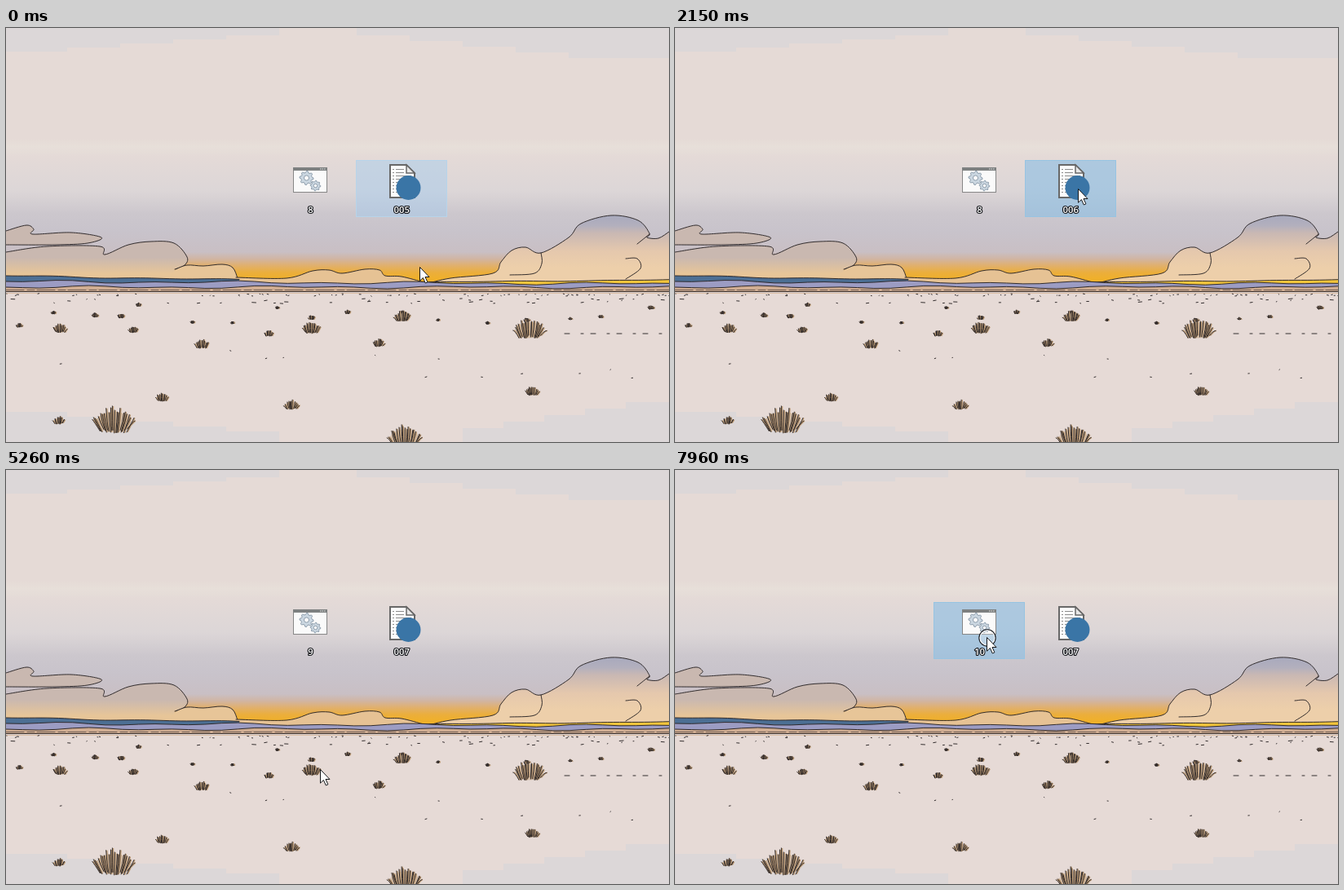
Animation, 813 px wide and 508 px high, one loop 8000 ms. Source, as an HTML page:

```html
<!DOCTYPE html>
<html lang="en">
<head>
<meta charset="utf-8">
<title>Desert desktop</title>
<style>
  html, body { margin: 0; width: 100%; height: 100%; overflow: hidden; background: #e6dad6; }
  svg { display: block; width: 100%; height: 100%; }
  .ink { fill: none; stroke: #2a2425; stroke-width: .95; stroke-linecap: round; stroke-linejoin: round; }
  .label { font: 600 11.3px "Open Sans", "Noto Sans", sans-serif; text-anchor: middle; fill: #fff;
    stroke: #101216; stroke-width: 2.2px; stroke-linejoin: round; paint-order: stroke; }
</style>
</head>
<body>
<svg viewBox="0 0 813 508" preserveAspectRatio="none">
  <defs>
    <linearGradient id="sky" gradientUnits="userSpaceOnUse" x1="0" y1="0" x2="0" y2="325"></linearGradient>
    <linearGradient id="west" gradientUnits="userSpaceOnUse" x1="0" y1="242" x2="0" y2="308">
      <stop offset=".6" stop-color="#c9b8b0"/><stop offset=".9" stop-color="#e7c598"/>
    </linearGradient>
    <linearGradient id="east" gradientUnits="userSpaceOnUse" x1="0" y1="230" x2="0" y2="310">
      <stop offset="0" stop-color="#a8a9bd"/><stop offset=".16" stop-color="#b3b0bd"/>
      <stop offset=".27" stop-color="#c9b8b3"/><stop offset=".55" stop-color="#e5c8ad"/><stop offset=".8" stop-color="#edcfaa"/>
    </linearGradient>
  </defs>
  <rect width="813" height="325" fill="url(#sky)"/>
  <g id="land"></g>
  <rect y="324" width="813" height="184" fill="#e6dad6"/>
  <g id="corners" fill="#dcd7d8"></g>
  <path class="ink" d="M0 323.5H813"/>
  <path d="M0 325.5H813" stroke="#d9bca3"/>
  <g id="plants"></g>

  <rect id="pick8" x="317.5" y="162.5" width="111" height="69"/>
  <rect id="pickDoc" x="429.5" y="162.5" width="111" height="69"/>

  <rect x="352.5" y="171.5" width="41" height="30" fill="#fafafa" stroke="#878787"/>
  <path d="M352 171H394V175H352Z" fill="#7d8080"/>
  <path d="M385 173H392" stroke="#e8e8e8" stroke-dasharray="1.5 1"/>
  <g id="gears" fill="#cbd7e1" stroke="#8596a5" stroke-width=".9"></g>

  <path d="M471 168H491L501 178V208H471Z" fill="#fcfcfc" stroke="#686868" stroke-width="2"/>
  <path d="M491 168V178H501Z" fill="#e8e8e8" stroke="#686868" stroke-width="1.5"/>
  <path id="rows" stroke="#8c8c8c"/>
  <circle cx="493.5" cy="196" r="15" fill="#3a75a6"/>

  <text id="name8" class="label" x="373.5" y="227.3"></text>
  <text id="nameDoc" class="label" x="485.2" y="227.3"></text>

  <g id="cursor">
    <g id="ring" fill="none">
      <circle cx="1" cy="1" r="9.2" stroke="#fff" stroke-width="1.4" fill="#fff" fill-opacity=".25"/>
      <circle cx="1" cy="1" r="10.2" stroke="#1c1f24" stroke-width="1.1"/>
    </g>
    <path d="M.5 .5V17.2L4.4 13.5 7.3 20 9.9 18.8 7 12.5H12Z" fill="#fff" stroke="#15171a"/>
  </g>
</svg>
<script>
const $ = id => document.getElementById(id);
const loop = (n, f) => Array.from({ length: n }, (_, i) => f(i)).join('');
let seed = 11;
const rnd = () => (seed = seed * 16807 % 2147483647) / 2147483647;
const span = (a, b) => a + (b - a) * rnd();

// Smooth path through "x,y x,y ..." points
function curve(text) {
  const p = text.split(' ').map(s => s.split(',').map(Number));
  const handle = (at, from, to, k) => at.map((v, j) => v + (to[j] - from[j]) * k / 6);
  return `M${p[0]}` + loop(p.length - 1, i => {
    const a = p[i - 1] || p[i], b = p[i], c = p[i + 1], d = p[i + 2] || c;
    return `C${handle(b, a, c, 1)} ${handle(c, b, d, -1)} ${c}`;
  });
}
const shape = (line, fill, close) => `<path d="${line}${close}" fill="${fill}"/><path class="ink" d="${line}"/>`;
const cloud = (points, fill, close = 'V324H0Z') => shape(curve(points), fill, close);

const sky = { 0: '#e5dad6', 136: '#e5dad6', 146: '#e7dfd9', 158: '#e4dad7', 200: '#dcd6d7', 228: '#ccc7cd',
  250: '#c8c3cb', 275: '#c9bfc4', 283: '#d0b5a4', 291: '#e0b070', 300: '#ebae3c', 308: '#f0b02a' };
$('sky').innerHTML = Object.entries(sky).map(([y, c]) => `<stop offset="${y / 325}" stop-color="${c}"/>`).join('');

// Grey corners in blocky steps
const block = (x, y, w, h) => `<path d="M${x} ${y}h${w}v${h}h${-w}z"/>`;
$('corners').innerHTML = loop(5, i =>
  block(0, 0, 335 - 65 * i, 9 + 5 * i) + block(430 + 65 * i, 0, 383, 9 + 7 * i) +
  block(0, 471 + 6 * i, 75 + 65 * i, 40) + block(760 - 50 * i, 459 + 8 * i, 400, 50));

// Rolling strip: height falls from y0 to y1, with seeded ripples
function hills(x0, x1, y0, y1, swing, fill) {
  const phase = span(0, 6);
  const line = loop(41, i => {
    const u = i / 40, x = x0 + (x1 - x0) * u;
    const y = y0 + (y1 - y0) * u + swing * Math.sin(x / 23 + phase) * Math.sin(x / 61);
    return `${i ? 'L' : 'M'}${x},${y}`;
  });
  return shape(line, fill, `V324H${x0}Z`);
}

$('land').innerHTML =
  cloud('0,275 50,268 115,268 121,278 150,266 178,262 206,264 222,281 219,291 207,296', 'url(#west)') +
  cloud('0,249 25,242 34,247 33,253 80,251 117,257 100,264 60,266 0,266', '#c9b8b0', 'Z') +
  cloud('208,296 222,291 242,292 265,290 278,294 284,307', '#e7c598', 'V324H190Z') +
  cloud('282,306 344,307 376,298 396,297 412,301 440,296 458,297 465,304 485,305 512,312', '#e6c294', 'V324H282Z') +
  cloud('515,314 545,307 597,301 607,287 620,273 637,269 656,276 690,257 705,240 742,230 775,236 789,252 786,257 800,258 813,250', 'url(#east)', 'V324H515Z') +
  `<path class="ink" d="${curve('656,276 657,289 648,301 618,303')}${curve('760,283 774,283 778,295 760,308')}${curve('774,265 789,253')}"/>` +
  hills(510, 813, 312, 309, .6, '#f3c53c') +
  hills(0, 286, 304, 309, 1, '#4c6f94') +
  hills(0, 813, 311, 314, 2, '#9c9cc3') +
  hills(0, 813, 318, 318, 2, '#d0ad92') +
  '<path class="ink" d="M0 321.5H813" stroke-dasharray="22 4 9 3" opacity=".6"/>';

// Fan of blades growing from (x, y), w wide
function tuft(x, y, w) {
  const h = w * .6, n = Math.round(5 + w * .3);
  const blades = loop(n, i => {
    const u = (i + rnd()) / n * 2 - 1, top = y - h * (1 - .55 * u * u) * span(.75, 1);
    return `M${x + u * w * .32},${y - h * .15 * rnd()}Q${x + u * w * .45},${y - h * .4} ${x + u * w * .5},${top}`;
  });
  return `<ellipse cx="${x}" cy="${y - h * .4}" rx="${w * .38}" ry="${h * .38}" fill="#cbb195" opacity=".75"/>
    <path d="${blades}" fill="none" stroke="#b99873" stroke-width="1.6" transform="translate(1 0)"/>
    <path class="ink" d="${blades}" stroke-width=".8"/>`;
}
const bushes = '132,497,56 642,381,43 489,514,46 374,375,25 486,360,22 66,374,19 240,393,19 645,451,19 191,458,17 65,486,16 350,468,20 457,391,16 156,374,13 322,378,12 141,356,10';
const specks = (n, y0, y1, w) => loop(n, () => `M${span(0, 813)},${span(y0, y1)}l${span(.3, w)},${span(-.6, .6)}`);
$('plants').innerHTML =
  `<path class="ink" d="${specks(65, 326, 329, 2)}${specks(38, 332, 338, 5)}${specks(12, 390, 435, 2)}" stroke-width="1.2"/>` +
  '<path class="ink" d="M685 375H806" stroke-dasharray="6 14 3 9"/>' +
  loop(16, i => tuft(i * 52 + span(0, 25), span(340, 368), span(4, 9))) +
  bushes.split(' ').map(b => tuft(...b.split(',').map(Number))).join('');

function gear(cx, cy, r) {
  const teeth = loop(32, i => {
    const a = i / 16 * Math.PI, q = i % 4 < 2 ? r : r * .77;
    return `${i ? 'L' : 'M'}${cx + q * Math.cos(a)},${cy + q * Math.sin(a)}`;
  });
  return `<path d="${teeth}Z"/><circle cx="${cx}" cy="${cy}" r="${r * .36}" fill="#fafafa"/>`;
}
$('gears').innerHTML = gear(368.5, 184, 8.5) + gear(379.5, 193.5, 6.3);
$('rows').setAttribute('d', loop(8, i => `M474 ${173.5 + 4 * i}h2m2 0h${i < 2 ? 10 : 19}`));

// Pointer trips; a trip with "done" ends in a double click finished at that time
const trip = (start, end, x, y, done) => ({ start, end, x, y, done });
const trips = [
  trip(0, 0, 507, 293),
  trip(60, 340, 497, 198, 560), trip(720, 1160, 492, 358),
  trip(1770, 2150, 494, 197, 2570), trip(2630, 2960, 476, 367),
  trip(3510, 3960, 384, 205, 4230), trip(4290, 4770, 385, 367),
  trip(5440, 5900, 383, 205, 6200), trip(6280, 6550, 425, 320),
  trip(7350, 7900, 382, 205, 8140)];
const STEP = 55, CLICK = 180;
const ease = u => u * u * (3 - 2 * u);

const looks = {
  none: ['none', 'none'],
  hover: ['rgba(200,226,245,.5)', '#c3dcec'],
  selected: ['rgba(160,203,240,.45)', '#b7d4ea'],
  both: ['rgba(145,192,228,.65)', '#97c4e2']
};
function paintPick(id, selected, hover) {
  const [fill, stroke] = looks[selected ? hover ? 'both' : 'selected' : hover ? 'hover' : 'none'];
  $(id).setAttribute('fill', fill);
  $(id).setAttribute('stroke', stroke);
}

function draw(t) {
  const n = trips.findLastIndex(p => t >= p.start), now = trips[n], from = trips[n - 1] || now;
  const stepped = (Math.floor((t - now.start) / STEP) + 1) * STEP;
  const k = t >= now.end ? 1 : ease(Math.min(1, stepped / (now.end - now.start)));
  const x = from.x + (now.x - from.x) * k, y = from.y + (now.y - from.y) * k;
  const left = now.done - t;
  const over = now.done && y < 232, on8 = now.x < 429;

  paintPick('pickDoc', t < 4050, over && !on8);
  paintPick('pick8', on8 && left > 0 && left <= CLICK, over && on8 && left > 0);
  $('nameDoc').textContent = t < 1590 ? '005' : t < 3450 ? '006' : '007';
  $('name8').textContent = t < 5260 ? '8' : t < 7170 ? '9' : '10';
  $('cursor').setAttribute('transform', `translate(${Math.round(x)} ${Math.round(y)})`);
  const pressed = left > 0 && left <= CLICK && Math.ceil(left / 60) !== 2;
  $('ring').setAttribute('visibility', pressed ? 'visible' : 'hidden');
}

const begin = performance.now();
function tick() {
  draw((performance.now() - begin) % 8000);
  requestAnimationFrame(tick);
}
tick();
</script>
</body>
</html>
```
